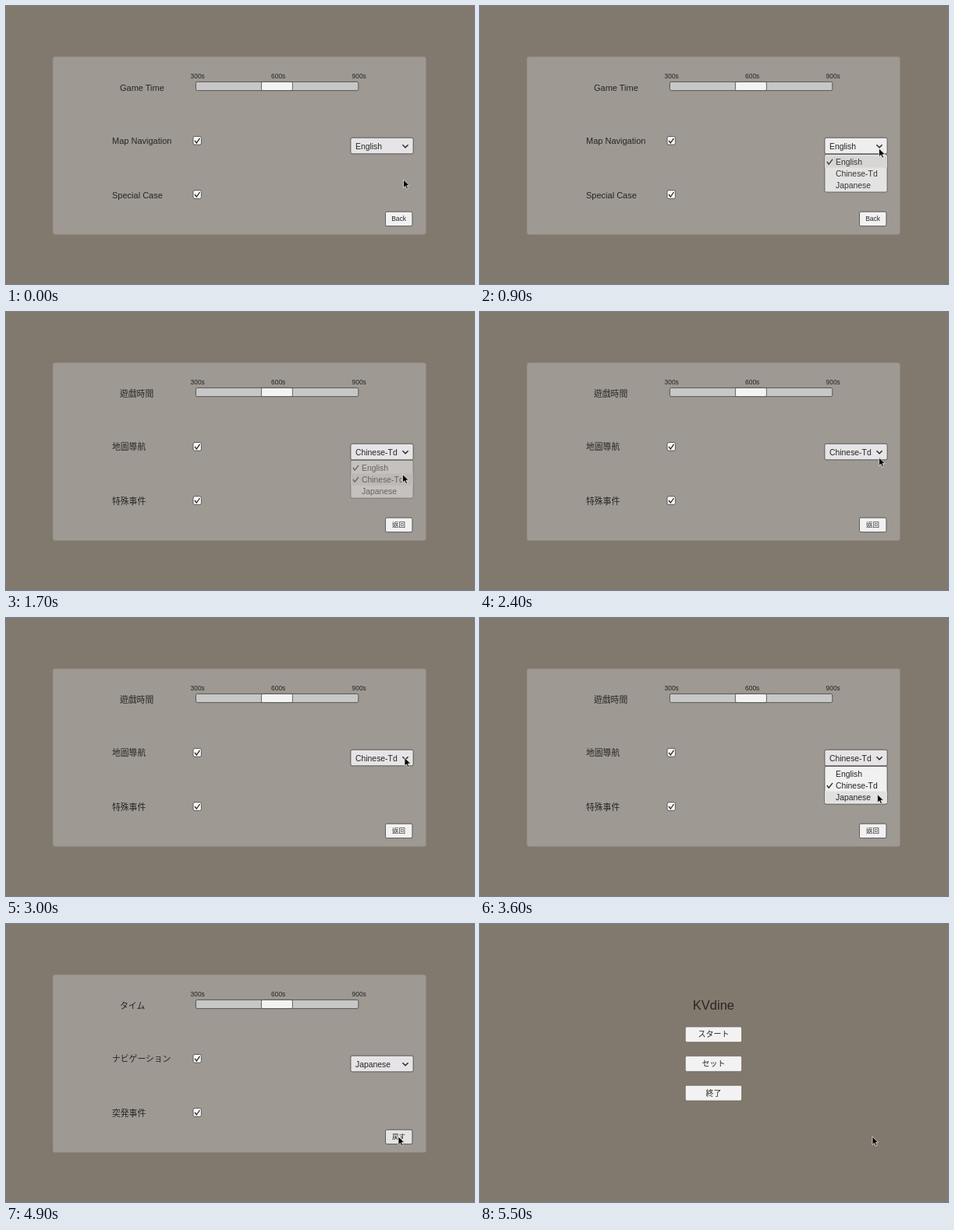
Write an HTML page that moves like this. It is 600x357 px and loops after 7 s.

```html
<!DOCTYPE html>
<html lang="en">
<head>
<meta charset="utf-8">
<style>
html, body { margin: 0; width: 100%; height: 100%; overflow: hidden; background: #82796e; }
svg { display: block; width: 100%; height: 100%; }
text { font-family: "Liberation Sans", Arial, "Noto Sans CJK JP", "Noto Sans CJK", sans-serif; fill: #262523; white-space: pre; }
text[lang="zh-Hant"] { font-family: "Liberation Sans", "Noto Sans CJK TC", "Noto Sans CJK", sans-serif; }
</style>
</head>
<body>
<svg id="stage" viewBox="0 0 600 357"></svg>
<script>
const LOOP = 7000, STEP = 100;
const stage = document.getElementById('stage');

const languages = [
  { name: 'English', code: 'en', labels: ['Game Time', 'Map Navigation', 'Special Case'], back: 'Back' },
  { name: 'Chinese-Td', code: 'zh-Hant', labels: ['遊戲時間', '地圖導航', '特殊事件'], back: '返回' },
  { name: 'Japanese', code: 'ja', labels: ['タイム', 'ナビゲーション', '突発事件'], back: '戻す' }
];

// Pointer stops: time, x, y
const stops = [
  [100, 509.5, 223], [500, 511.5, 183], [900, 511.5, 183], [1400, 508.5, 208.5],
  [1700, 508.5, 208.5], [2400, 511.5, 187], [2900, 511.5, 187], [3100, 510.5, 172],
  [3200, 510.5, 172], [3600, 509.5, 226.5], [3900, 509.5, 226.5], [4100, 507.5, 198],
  [4300, 507.5, 198], [4900, 503, 273]
];
// Times at which the list opens and an entry is picked
const openings = [[900, 1700], [3200, 3900]];

function pointerAt(t) {
  const i = stops.findIndex(s => s[0] >= t);
  if (i < 0) return stops[stops.length - 1].slice(1);
  if (i === 0) return stops[0].slice(1);
  const [t0, x0, y0] = stops[i - 1], [t1, x1, y1] = stops[i];
  const u = (t - t0) / (t1 - t0), e = u * u * (3 - 2 * u);
  return [x0 + (x1 - x0) * e, y0 + (y1 - y0) * e];
}

const box = (x, y, w, h, fill, stroke = '#45423f', r = 2) =>
  `<rect x="${x}" y="${y}" width="${w}" height="${h}" rx="${r}" fill="${fill}" stroke="${stroke}" stroke-width=".8"/>`;
const text = (s, x, y, size, anchor = 'start', lang = 'en') =>
  `<text x="${x}" y="${y}" font-size="${size}" text-anchor="${anchor}" lang="${lang}">${s}</text>`;
const line = (d, width = 1.3) =>
  `<path d="${d}" fill="none" stroke="#262523" stroke-width="${width}"/>`;

function cursor([x, y]) {
  return `<path transform="translate(${x} ${y})" d="M0 0V10.6L2.5 8.3 4.2 12.1 6 11.3 4.4 7.6H7.8Z" fill="#050505" stroke="#e8e8e8" stroke-width=".8"/>`;
}

function slider() {
  return box(243.4, 97.4, 208.4, 11.2, '#c8c7c7') + box(327.4, 97.4, 40, 11.2, '#f3f3f3') +
    [300, 600, 900].map((n, i) => text(n + 's', 245.7 + i * 103.5, 93.3, 8.4, 'middle')).join('');
}

function checkbox(y) {
  return box(240, y - 5.3, 10.4, 10.6, '#f5f5f5') + line(`M242 ${y}l2.3 3 4.2-6`);
}

function list(t, [x, y], lang) {
  const span = openings.find(([a, b]) => t >= a && t <= b);
  if (!span) return '';
  const picked = t === span[1], previous = span === openings[0] ? 0 : 1;
  const alpha = t === span[0] ? .85 : picked ? .46 : 1;
  const hovered = Math.floor((y - 192.5) / 15);
  const active = hovered >= 0 && hovered < 3 ? hovered : previous;
  const rows = languages.map((l, i) => {
    const mid = 200 + i * 15;
    const checked = i === previous || picked && i === lang;
    return (i === active ? `<rect x="442" y="${mid - 7.5}" width="80" height="15" fill="#e2e1e1"/>` : '') +
      (checked ? line(`M444.8 ${mid}l2.4 3.2 4.8-6.4`) : '') +
      text(l.name, 456, mid + 3.8, 10.4);
  });
  return `<g opacity="${alpha}">${box(441.9, 190.4, 80.2, 48.6, '#f1f1f1')}${rows.join('')}</g>`;
}

function settings(t, pointer) {
  const index = t < 1700 ? 0 : t < 3900 ? 1 : 2;
  const lang = languages[index];
  const overBack = pointer[1] > 264 && pointer[1] < 283;
  const labels = lang.labels.map((s, i) =>
    text(s, i ? 136 : 146, [108.8, 177, 246.5][i], index ? 10.8 : 11, 'start', lang.code));
  return box(60, 65, 478.6, 228.6, '#9e9993', '#8c857d', 3) + labels.join('') + slider() +
    checkbox(172.8) + checkbox(242) +
    box(441.9, 169.2, 80.2, 20.6, t >= 500 && t < 1700 ? '#efeeef' : '#e6e4e6') +
    text(lang.name, 448, 183.7, 10.4) + line('M508.4 178.2l3.6 3.6 3.6-3.6', 1.4) +
    box(486.5, 264.2, 34.4, 18.4, overBack ? '#e4e3e5' : '#f2f1f2') +
    text(lang.back, 503.6, 276.3, 8.5, 'middle', lang.code) + list(t, pointer, index);
}

function menu() {
  return text('KVdine', 299.4, 110, 16.5, 'middle') +
    ['スタート', 'セット', '終了'].map((s, i) => {
      const y = 132 + i * 37.6;
      return box(263.2, y, 72.4, 19.8, '#f2f2f2', '#6b645c') + text(s, 299.4, y + 13.4, 10, 'middle', 'ja');
    }).join('');
}

let shown = -1;
function frame(now) {
  const t = Math.floor(now % LOOP / STEP) * STEP;
  if (t !== shown) {
    shown = t;
    const pointer = pointerAt(t);
    stage.innerHTML = (t < 5500 ? settings(t, pointer) : menu()) + cursor(pointer);
  }
  requestAnimationFrame(() => frame(performance.now()));
}
frame(performance.now());
</script>
</body>
</html>
```
